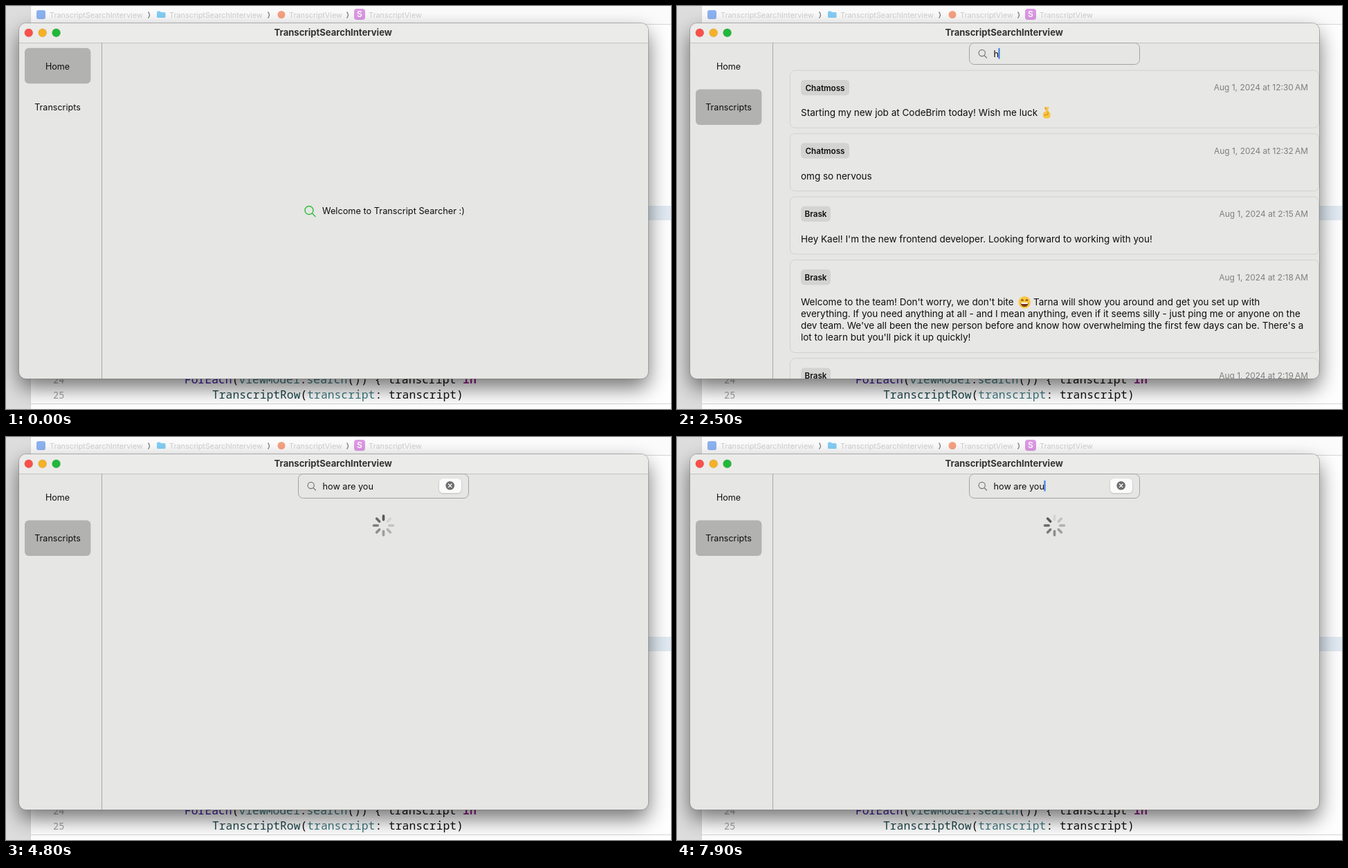
An HTML page that plays this animation: 961 px wide and 583 px high, repeating every 8000 ms.

```html
<!DOCTYPE html>
<html lang="en">
<head>
<meta charset="utf-8">
<title>Transcript search</title>
<style>
  html, body { margin: 0; width: 100%; height: 100%; overflow: hidden; background: #fff; }
  svg { display: block; width: 100%; height: 100%; }
  text { font-family: Inter, "Open Sans", sans-serif; fill: #0e0e0e; white-space: pre; }
  .nav { font-size: 12.55px; text-anchor: middle; }
  .crumb { font-size: 10.85px; fill: #cfcfcf; }
  .body { font-size: 13.5px; }
  .badge { font-size: 11.7px; font-weight: 600; text-anchor: middle; }
  .date { font-size: 11.95px; fill: #7f7f7f; text-anchor: end; }
  .code { font: 16.35px "Noto Sans Mono", "DejaVu Sans Mono", monospace; }
  .num { font: 13.6px "Noto Sans Mono", "DejaVu Sans Mono", monospace; fill: #a3a3a3; }
  .teal { fill: #3c7a82; }
</style>
</head>
<body>
<svg viewBox="0 0 961 583">
  <defs>
    <clipPath id="frame"><rect x="19" y="25" width="909" height="514" rx="10"/></clipPath>
    <filter id="blur" x="-10%" y="-15%" width="120%" height="130%"><feGaussianBlur stdDeviation="15"/></filter>
    <filter id="soft" x="-30%" y="-30%" width="160%" height="160%"><feGaussianBlur stdDeviation="1"/></filter>
  </defs>

  <!-- editor behind the window -->
  <rect width="961" height="583" fill="#fefefe"/>
  <rect width="36" height="583" fill="#dddddd"/>
  <rect x="36" width="925" height="26" fill="#fbfbfb"/>
  <path d="M35.5 0V583M36 26.5H961M36 575.5H961" stroke="#d6d6d6"/>
  <rect x="36" y="289" width="925" height="21" fill="#e1eaf3"/>
  <g id="crumbs">
    <rect x="44" y="6" width="13" height="13" rx="3" fill="#8db3f0"/>
    <path d="M218 9q0-1.500 1.500-1.500h3l1.500 1.500h5q1.500 0 1.500 1.500v5q0 1.500-1.500 1.500h-9.500q-1.500 0-1.500-1.500z" fill="#84cdf4"/>
    <circle cx="398" cy="12.500" r="5.500" fill="#f5a183"/>
    <rect x="503" y="4" width="16" height="16" rx="4" fill="#dd98e5"/>
    <text x="511" y="16.300" font-size="12" font-weight="600" text-anchor="middle" style="fill:#fff">S</text>
  </g>
  <text class="num" x="68" y="545.500">24</text>
  <text class="num" x="68" y="568">25</text>
  <text class="code" x="258" y="546"><tspan fill="#3d15a0">ForEach</tspan>(<tspan class="teal">viewModel</tspan>.<tspan class="teal">search</tspan>()) { transcript <tspan fill="#9b2393" font-weight="700">in</tspan></text>
  <text class="code" x="298" y="568"><tspan fill="#1c464a">TranscriptRow</tspan>(<tspan class="teal">transcript</tspan>: transcript)</text>

  <!-- application window -->
  <rect x="19" y="38" width="909" height="514" rx="10" opacity=".55" filter="url(#blur)"/>
  <rect x="18.500" y="24.500" width="910" height="515" rx="10.500" fill="#e6e6e4" stroke="#000" stroke-opacity=".25"/>
  <g clip-path="url(#frame)">
    <rect x="19" y="25" width="909" height="28" fill="#ebebe9"/>
    <path d="M19 53.500H928" stroke="#c3c3c1"/>
    <path d="M138.500 53V539" stroke="#a9a9a7"/>
    <g stroke="#000" stroke-opacity=".12" stroke-width=".7">
      <circle cx="32.800" cy="38.800" r="6" fill="#f9504b"/>
      <circle cx="52.700" cy="38.800" r="6" fill="#f6b127"/>
      <circle cx="72.600" cy="38.800" r="6" fill="#21b83a"/>
    </g>
    <text x="472.700" y="42.700" font-size="13.050" font-weight="700" text-anchor="middle" style="fill:#333">TranscriptSearchInterview</text>

    <rect id="homeButton" x="27" y="60.700" width="95.400" height="51.500" rx="6" fill="#b2b2b1"/>
    <text class="nav" x="74.500" y="91.500">Home</text>
    <g id="listNav">
      <rect id="listButton" x="27" y="120.600" width="95.400" height="51.500" rx="6"/>
      <text class="nav" x="74.500" y="151">Transcripts</text>
    </g>

    <g id="home">
      <path d="M443 300.500L447 304.500M444 295.500a6 6 0 1 1-12 0a6 6 0 1 1 12 0" fill="none" stroke="#35bd40" stroke-width="1.500" stroke-linecap="round"/>
      <text x="457" y="301" font-size="12.750">Welcome to Transcript Searcher :)</text>
    </g>

    <g id="list"></g>

    <g id="search">
      <rect id="field" x="422.500" y="53.500" width="246" rx="7" fill="#e6e6e4" stroke="#a3a3a1"/>
      <g id="entry">
        <path d="M444 71.500L447.500 75M445.300 68a4.600 4.600 0 1 1-9.200 0a4.600 4.600 0 1 1 9.200 0" fill="none" stroke="#777" stroke-width="1.200" stroke-linecap="round"/>
        <text id="query" x="457.500" y="73.700" font-size="12.700"></text>
        <rect id="caret" y="61" width="2" height="15.500" fill="#3478e0"/>
      </g>
      <g id="clear">
        <rect x="626" y="61" width="32" height="20.500" rx="5.500" opacity=".25" filter="url(#soft)"/>
        <rect x="626" y="60" width="32" height="21" rx="5.500" fill="#fbfbfb"/>
        <circle cx="641.700" cy="70.300" r="6.300" fill="#6d6d6d"/>
        <path d="M639.400 68l4.600 4.600m0-4.600l-4.600 4.600" stroke="#fff" stroke-width="1.300" stroke-linecap="round"/>
      </g>
    </g>
    <g id="spinner" transform="translate(545.5 128)" stroke="#222" stroke-width="3.600" stroke-linecap="round"></g>
  </g>

  <g id="pointer">
    <path id="arrow" d="M0 0V16.500L3.900 13L6.700 19.500L9.700 18.200L7 12H12z" stroke="#fff" stroke-width="1.200"/>
    <path id="beam" d="M-3-8q3 0 3 2.500V5.500q0 2.500-3 2.500M3-8q-3 0-3 2.500V5.500q0 2.500 3 2.500" fill="none" stroke="#222"/>
  </g>
</svg>
<script>
const LOOP = 8000, STEP = 100;
const ARRIVE = 800, OPEN = 1100, FOCUS = 2000, FILTER = 2600, LOAD = 4500;
const QUERY = 'how are you';
const KEY_TIMES = [2500, 2600, 2800, 2900, 3000, 3200, 3400, 3500, 3700, 3900, 4000];
const PATH = [[400, 290, 600], [ARRIVE, 85, 148], [1200, 85, 148], [1900, 540, 70]];
const $ = id => document.getElementById(id);
const show = (id, on) => $(id).setAttribute('display', on ? 'inline' : 'none');
const set = (id, attrs) => { for (const k in attrs) $(id).setAttribute(k, attrs[k]); };

function add(parent, name, attrs, content = '') {
  const node = document.createElementNS('http://www.w3.org/2000/svg', name);
  for (const k in attrs) node.setAttribute(k, attrs[k]);
  node.textContent = content;
  $(parent).append(node);
  return node;
}

function card(y, height, app, time, lines) {
  const width = app.length > 5 ? 70 : 43;
  add('list', 'rect', { x: 163.5, y, width: 764, height, rx: 7, fill: '#e7e7e5', stroke: '#d1d1cf' });
  add('list', 'rect', { x: 179, y: y + 13.7, width, height: 22.3, rx: 5, fill: '#d3d3d2' });
  add('list', 'text', { class: 'badge', x: 179 + width / 2, y: y + 29.3 }, app);
  add('list', 'text', { class: 'date', x: 912, y: y + 29.2 }, `Aug 1, 2024 at ${time}\u202fAM`);
  lines.forEach((line, i) => add('list', 'text', { class: 'body', x: 179, y: y + 66 + i * 17 }, line));
}

function buildList() {
  card(93.2, 83, 'Chatmoss', '12:30', ['Starting my new job at CodeBrim today! Wish me luck']);
  card(184.6, 83, 'Chatmoss', '12:32', ['omg so nervous']);
  card(276, 83, 'Brask', '2:15', ["Hey Kael! I'm the new frontend developer. Looking forward to working with you!"]);
  card(367.4, 134, 'Brask', '2:18', [
    "Welcome to the team! Don't worry, we don't bite",
    'everything. If you need anything at all - and I mean anything, even if it seems silly - just ping me or anyone on the',
    "dev team. We've all been the new person before and know how overwhelming the first few days can be. There's a",
    "lot to learn but you'll pick it up quickly!"]);
  add('list', 'text', { class: 'body', x: 515, y: 433.4 }, 'Tarna will show you around and get you set up with');
  card(509.8, 83, 'Brask', '2:19', []);

  // crossed fingers
  const finger = { fill: 'none', 'stroke-width': 2.8, 'stroke-linecap': 'round' };
  add('list', 'path', { ...finger, d: 'M536.500 155L532.500 147.500', stroke: '#e5a52c' });
  add('list', 'path', { ...finger, d: 'M533 155L536 147', stroke: '#fac748' });
  add('list', 'rect', { x: 529, y: 153, width: 10.5, height: 9.5, rx: 4, fill: '#f9c440' });
  add('list', 'path', { d: 'M530 157.500q3 1.500 6-1M536 153.500v4', fill: 'none', stroke: '#c98d24' });
  // grinning face
  add('list', 'circle', { cx: 502.2, cy: 428.6, r: 8.7, fill: '#fbc63b' });
  add('list', 'path', { d: 'M496.500 429h11.400q-.5 6-5.700 6t-5.700-6', fill: '#713b20' });
  add('list', 'path', { d: 'M497 429h10.400l-.7 2h-9z', fill: '#fff' });
  add('list', 'path', { d: 'M497.500 426.500q1.500-3 3 0M504 426.500q1.500-3 3 0', fill: 'none', stroke: '#5a3015', 'stroke-width': 1.3 });
}

function buildCrumbs() {
  const project = 'TranscriptSearchInterview', file = 'TranscriptView';
  [[63, project], [236, project], [409, file], [524, file]]
    .forEach(([x, label]) => add('crumbs', 'text', { class: 'crumb', x, y: 16.5 }, label));
  [205.5, 378.5, 492.5].forEach(x => add('crumbs', 'path',
    { d: `M${x} 8.500q4 4.500 0 9`, fill: 'none', stroke: '#858585', 'stroke-width': 1.4 }));
}

const blades = Array.from({ length: 8 }, (_, i) =>
  add('spinner', 'path', { d: 'M0-8.200V-14', transform: `rotate(${i * 45})` }));

function pointerAt(t) {
  const next = PATH.findIndex(p => p[0] > t);
  if (next < 0) return PATH[PATH.length - 1].slice(1);
  const [t0, x0, y0] = PATH[next - 1], [t1, x1, y1] = PATH[next];
  const u = (t - t0) / (t1 - t0), e = u * u * (3 - 2 * u);
  return [x0 + (x1 - x0) * e, y0 + (y1 - y0) * e];
}

function caretVisible(t) {
  const phase = t % 1000;
  return t >= FOCUS && (t < 4300 || phase < 300 || phase >= 850);
}

function draw(now) {
  const t = Math.floor(now % LOOP / STEP) * STEP;
  const opened = t >= OPEN, filtered = t >= FILTER;
  const hover = t >= ARRIVE && !opened;

  show('home', !opened);
  show('homeButton', !opened);
  show('search', opened);
  show('list', opened && !filtered);
  show('clear', filtered);
  show('spinner', t >= LOAD);

  set('listButton', { fill: opened ? '#b2b2b1' : hover ? '#dadad9' : 'none' });
  set('listNav', { transform: hover ? 'translate(74.500 146.500) scale(.98) translate(-74.500 -146.500)' : '' });

  set('field', { height: filtered ? 35 : 31 });
  set('entry', { transform: `translate(0 ${filtered ? 2 : 0})` });
  $('query').textContent = QUERY.slice(0, KEY_TIMES.filter(k => k <= t).length);
  set('caret', { x: 457 + (opened ? $('query').getComputedTextLength() : 0) });
  show('caret', caretVisible(t));

  const lead = t / STEP % 8;
  blades.forEach((blade, i) => blade.setAttribute('opacity', .72 - .09 * ((lead - i + 8) % 8)));

  const moving = t >= PATH[0][0] && t < KEY_TIMES[0];
  show('pointer', moving);
  if (moving) {
    const [x, y] = pointerAt(t);
    const overField = opened && x > 422 && y < 85;
    set('pointer', { transform: `translate(${x} ${y})` });
    show('arrow', !overField);
    show('beam', overField);
  }
}

buildCrumbs();
buildList();
const start = performance.now();
function tick() {
  draw(performance.now() - start);
  requestAnimationFrame(tick);
}
tick();
</script>
</body>
</html>
```
